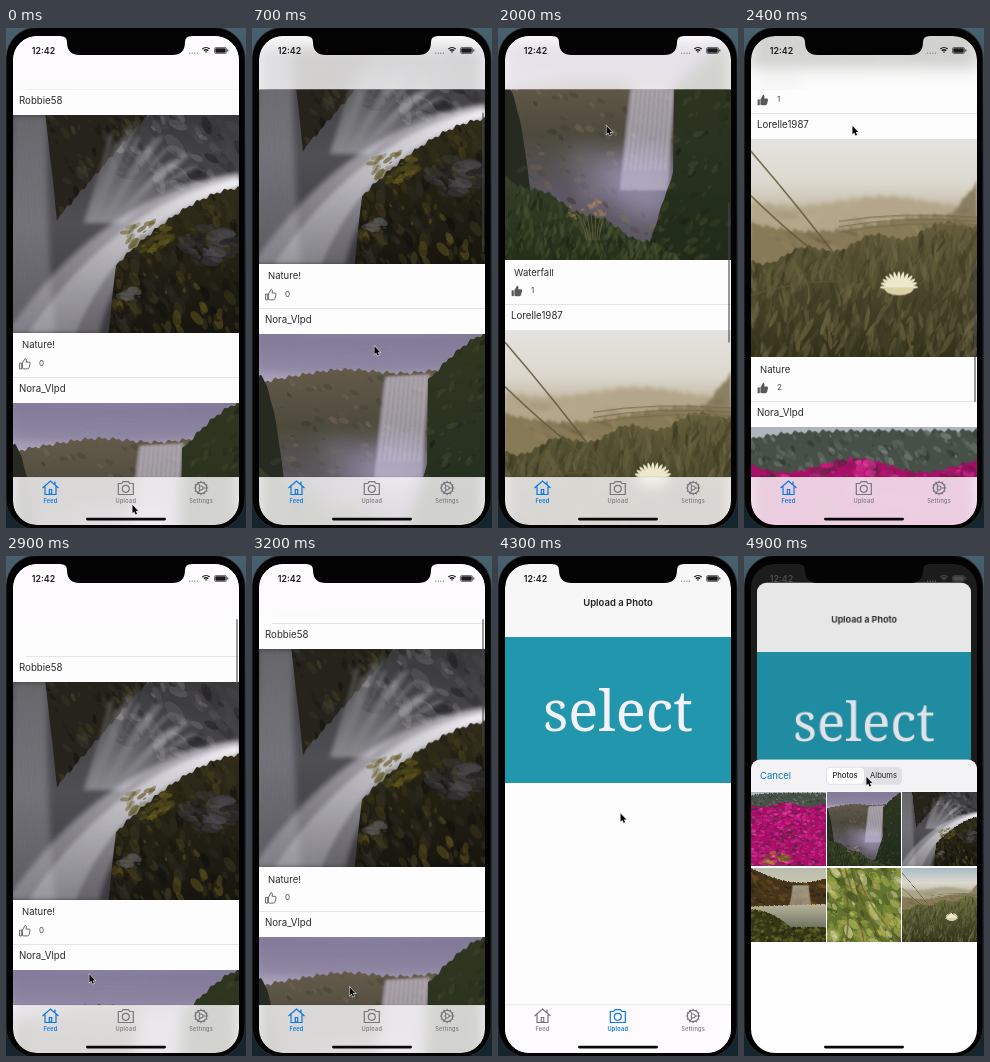
These frames come from a looping animation (240x500 px, 5000 ms). An HTML page with a canvas:

```html
<!DOCTYPE html>
<html lang="en">
<head>
<meta charset="utf-8">
<title>Photo feed</title>
<style>
html, body { margin: 0; width: 100%; height: 100%; overflow: hidden; background: #000; }
canvas { display: block; width: 240px; height: 500px; }
</style>
</head>
<body>
<canvas id="stage" width="240" height="500"></canvas>
<script>
const W = 240, H = 500, PW = 226, PH = 218, POST = 288, LOOP = 5000, STEP = 100;
const BLUE = '#0a78e6', GREY = '#77777b', SANS = 'Inter, "Liberation Sans", sans-serif';
const c = document.getElementById('stage').getContext('2d');

function layer(w, h) {
  const el = document.createElement('canvas');
  el.width = w;
  el.height = h;
  return el.getContext('2d');
}

let seed = 7;
function rnd(a = 0, b = 1) {
  seed = (seed * 1664525 + 1013904223) >>> 0;
  return a + (b - a) * seed / 4294967296;
}

function fade(g, y0, y1, ...colors) {
  const f = g.createLinearGradient(0, y0, 0, y1);
  colors.forEach((col, i) => f.addColorStop(i / (colors.length - 1), col));
  return f;
}

function box(g, x, y, w, h, fill, r = 0) {
  g.beginPath();
  g.roundRect(x, y, w, h, r);
  g.fillStyle = fill;
  g.fill();
}

function text(g, str, x, y, size, color = '#2a2a2c', weight = 400, align = 'left') {
  g.font = `${weight} ${size}px ${SANS}`;
  g.textAlign = align;
  g.textBaseline = 'middle';
  g.fillStyle = color;
  g.fillText(str, x, y);
}

// Photo painting: everything is a ridge, a scatter of dabs or a bundle of curves.
function dab(g, x, y, w, h, tilt, color) {
  const s = rnd(.3, 1.5);
  g.globalAlpha = rnd(.2, .65);
  g.fillStyle = color;
  g.beginPath();
  g.ellipse(x, y, w * s, h * s, tilt + rnd(-.5, .5), 0, 7);
  g.fill();
  g.globalAlpha = 1;
}

function cluster(g, n, tones, x, y, rx, ry, w, h, tilt = 0) {
  for (let i = 0; i < n; i++) {
    const a = rnd(0, 6.28), r = Math.sqrt(rnd());
    dab(g, x + rx * r * Math.cos(a), y + ry * r * Math.sin(a), w, h, tilt, tones[i % tones.length]);
  }
}

// Ground below the edge y = f(x), or rock hanging above it.
function land(g, edge, fill, tones = [], n = 0, { w = 4, h = 2, tilt = 0, hang = false, blur = .6 } = {}) {
  const l = layer(PW, PH), base = hang ? 0 : PH;
  l.moveTo(0, base);
  for (let x = 0; x <= PW; x++) l.lineTo(x, edge(x) + (hang ? 1 : -1) * (Math.sin(x * .45) + Math.sin(x * .9)));
  l.lineTo(PW, base);
  l.fillStyle = fill;
  l.fill();
  l.globalCompositeOperation = 'source-atop';
  for (let i = 0; i < n; i++) {
    const x = rnd(0, PW), y = edge(x);
    dab(l, x, y + (base - y) * rnd(), w, h, tilt, tones[i % tones.length]);
  }
  g.filter = `blur(${blur}px)`;
  g.drawImage(l.canvas, 0, 0);
  g.filter = 'none';
}

function stream(g, n, color, width, curve, blur = 1.5) {
  g.strokeStyle = color;
  g.lineWidth = width;
  g.filter = `blur(${blur}px)`;
  for (let i = 0; i < n; i++) {
    const [x, y, ...rest] = curve(i / (n - 1));
    g.beginPath();
    g.moveTo(x, y);
    g.quadraticCurveTo(...rest);
    g.stroke();
  }
  g.filter = 'none';
}

function photo(draw) {
  const g = layer(PW, PH);
  draw(g);
  return g.canvas;
}

const rapids = photo(g => {
  box(g, 0, 0, PW, PH, fade(g, 0, PH, '#39383a', '#504f54', '#39383d'));
  cluster(g, 90, ['#6f6e70', '#242325', '#48464a'], 160, 30, 75, 42, 9, 4, .8);
  stream(g, 16, 'rgba(190,190,198,.2)', 5, k => [34 * k, 0, 30 * k, 90, 50 * k - 10, PH], 3);
  land(g, x => x < 44 ? 104 - 9 * (44 - x) : 104 - 1.15 * (x - 44), '#25231b',
    ['#4b4521', '#15140f', '#3b3a35', '#121110'], 150, { w: 5, tilt: 1, hang: true });
  stream(g, 17, 'rgba(225,224,232,.3)', 3.5, k => [98 + 90 * k, 18 + 40 * k * k + 10 * Math.sin(k * 20), 92 + 55 * k, 50 + 20 * k, 72 + 38 * k, 108], 2);
  stream(g, 22, 'rgba(222,221,229,.2)', 6, k => [PW, 60 + 12 * k, 90 + 20 * k, 80 + 32 * k, 88 * k - 4, PH], 2);
  stream(g, 9, 'rgba(250,250,253,.32)', 3, k => [PW, 65 + 4 * k, 108, 85 + 20 * k, 18 + 42 * k, PH], 2);
  land(g, x => 73 + 77 * (Math.max(0, PW - x) / 123) ** 1.6 + Math.max(0, 103 - x) * 8, fade(g, 75, PH, '#302c18', '#232013', '#17150f'),
    ['#5b511c', '#100f0b', '#3a3619', '#1d1b13', '#2d2a22'], 420, { w: 6, h: 3, tilt: 1.2 });
  cluster(g, 45, ['#3d3b3e', '#19181a', '#535156'], 200, 130, 28, 19, 9, 4, .3);
  cluster(g, 45, ['#6a5f1d', '#514a1c'], 135, 122, 24, 15, 5, 2, -.5);
  cluster(g, 10, ['#5c5a58'], 118, 180, 10, 5, 6, 3);
});

const falls = photo(g => {
  box(g, 0, 0, PW, PH, fade(g, 0, 120, '#8d86a3', '#b0a8bf', '#8e859f'));
  stream(g, 9, 'rgba(110,102,132,.22)', 7, k => [0, 34 * k, 110, 34 * k + 8, PW, 30 * k], 3);
  land(g, x => 37 + 13 * Math.exp(-x / 25) + 2 * Math.sin(x / 18), fade(g, 35, 150, '#645a4a', '#4d4a3c', '#5d5763'),
    ['#71654f', '#45483a', '#39392f', '#5c5547'], 240, { tilt: .5 });
  land(g, x => 42 + x * x / 6, '#262a20', ['#1a1e16', '#343a2a'], 30);
  g.filter = 'blur(11px)';
  cluster(g, 9, ['#a69dbd'], 118, 138, 48, 20, 24, 16);
  g.filter = 'none';
  stream(g, 26, 'rgba(205,197,221,.42)', 3, k => [127 + 43 * k, 43 - 3 * k, 122 + 44 * k, 80, 116 + 46 * k, 148], 1.2);
  stream(g, 9, 'rgba(240,236,250,.35)', 1.5, k => [130 + 36 * k, 42, 126 + 38 * k, 85, 120 + 40 * k, 128], 1);
  land(g, x => x > 168 ? 48 * ((PW - x) / 58) ** 1.4 : 130 + 3 * (168 - x), fade(g, 0, PH, '#30361f', '#293220', '#202a18'),
    ['#3e4727', '#171d13', '#424529', '#242e1b'], 420, { tilt: -.8 });
  land(g, x => 134 + .46 * x + 3 * Math.sin(x / 9), fade(g, 134, PH, '#343d28', '#263019'),
    ['#435029', '#1a2415', '#3a4826', '#4b5536'], 420, { w: 1.5, h: 5, tilt: .2 });
  stream(g, 7, '#67664a', .7, k => [82 + 12 * k, 198, 78 + 18 * k, 175, 62 + 44 * k, 160 + 10 * Math.sin(k * 9)], .3);
  cluster(g, 26, ['#a97d58', '#b58c66'], 82, 166, 20, 13, 2, 1.3);
});

function field(sky, haze, dark, light) {
  return photo(g => {
    box(g, 0, 0, PW, PH, fade(g, 0, 90, sky, '#dcd8ce', haze));
    land(g, x => 62 + 5 * Math.sin(x / 28), haze, ['#bbae8e', '#93856a', '#a39575'], 120, { w: 12, blur: 2 });
    land(g, x => 100 - 57 * Math.max(0, (x - 180) / 46), '#8b7f63', ['#6d6347', '#a09476'], 60, { blur: 1.5 });
    land(g, x => 84 + 8 * Math.sin(x / 40), '#877a57', ['#9c8d68', '#685b3d', '#776a49'], 200, { w: 8, h: 1.5, tilt: .6, blur: 1 });
    land(g, x => 122 - .18 * x + 5 * Math.sin(x / 11), fade(g, 85, PH, light, dark, '#33301b'),
      [dark, light, '#3a371f', '#706843'], 620, { w: 2, h: 9, tilt: .15 });
    stream(g, 3, '#5f5538', 1.2, k => [0, 12 + 34 * k + 110 * k * k, 50, 70 + 70 * k, 95, 130 + 12 * k], .4);
    stream(g, 3, '#776b4e', 1, k => [PW, 78 + 8 * k, 150, 72 + 9 * k, 88, 82 + 11 * k], .4);
    for (let a = Math.PI; a < 6.4; a += .26) {
      g.fillStyle = '#eee9cb';
      g.beginPath();
      g.ellipse(148 + 10 * Math.cos(a), 148 + 7 * Math.sin(a), 9, 1.8, Math.atan2(Math.sin(a), Math.cos(a)), 0, 7);
      g.fill();
    }
    g.beginPath();
    g.ellipse(148, 148, 15, 8, 0, 0, Math.PI);
    g.fillStyle = '#dad2a6';
    g.fill();
  });
}
const dunes = field('#e5e3e0', '#b3a68a', '#48452a', '#665f3c');
const coast = field('#a9bac6', '#aaa58b', '#47502a', '#727544');

const blooms = photo(g => {
  box(g, 0, 0, PW, PH, '#aeb5bd');
  land(g, x => 3 + 9 * Math.exp(-x / 30), '#465047', ['#6b766b', '#2b352d', '#566157', '#838b82'], 900, { tilt: .8 });
  land(g, x => 38 + 7 * Math.sin(x / 22), '#a80f68', ['#dc2896', '#c8147f', '#761050', '#2f3528', '#e846a4'], 900, { w: 5, h: 3 });
  cluster(g, 45, ['#c6a735', '#59641f'], 75, 200, 48, 22, 8, 4);
});

const cove = photo(g => {
  box(g, 0, 0, PW, PH, fade(g, 0, 110, '#b9bcae', '#ddd5b6'));
  land(g, x => 44 * Math.sin(x / 95), '#46341a', ['#70501f', '#2b2313', '#5a4820'], 260, { w: 9, h: 4, tilt: .5 });
  stream(g, 12, 'rgba(235,229,213,.5)', 5, k => [128 + 42 * k, 52, 126 + 46 * k, 80, 118 + 60 * k, 114]);
  land(g, x => 114 - x / 30, fade(g, 106, 190, '#bbb69d', '#5f6754'));
  land(g, x => 122 + 52 * Math.min(1, x / 120) ** 2, '#343715', ['#626626', '#222610', '#7a702b'], 240, { w: 5, h: 4 });
});

const foliage = photo(g => {
  box(g, 0, 0, PW, PH, '#637331');
  cluster(g, 380, ['#9cab45', '#5e7428', '#c4c867', '#39491d', '#aaa650', '#d8d7a1'], 113, 109, 160, 150, 15, 8, .8);
  stream(g, 4, '#6b5428', 3, k => [40 + 50 * k, 0, 80 + 30 * k, 100, 60 + 160 * k, PH]);
});

const posts = [
  ['Robbie58', rapids, 'Nature!', 0],
  ['Nora_Vlpd', falls, 'Waterfall', 1],
  ['Lorelle1987', dunes, 'Nature', 2],
  ['Nora_Vlpd', blooms, '', 0]
];
const thumbs = [blooms, falls, rapids, cove, foliage, coast];

// Motion
const ramp = (t, a, b) => Math.min(1, Math.max(0, (t - a) / (b - a)));
const out = (t, a, b) => 1 - (1 - ramp(t, a, b)) ** 2;
function smooth(t, a, b) {
  const k = ramp(t, a, b);
  return k * k * (3 - 2 * k);
}

// Drag, fling down, fling back past the top, bounce.
const scrollAt = t => 226 * out(t, 600, 1200) + 334 * smooth(t, 1630, 2480)
  - 599 * smooth(t, 2450, 2870) + 39 * out(t, 2900, 3400);
const barAt = t => ramp(t, 600, 700) - ramp(t, 3700, 4000);
const sheetAt = t => ramp(t, 4660, 5030);

// Resting points of the pointer: time, x, y.
const stops = [[0, 126.5, 477], [500, 123, 390], [1000, 121.5, 186], [1600, 112, 260], [2000, 108.5, 98],
  [2400, 108.5, 98], [2850, 83, 418], [3700, 123, 454], [4500, 122.5, 221]];
function pointerAt(t) {
  let [, x, y] = stops[0];
  for (let i = 1; i < stops.length; i++) {
    const [a, px, py] = stops[i - 1], [b, qx, qy] = stops[i], k = smooth(t, a, b);
    x += (qx - px) * k;
    y += (qy - py) * k;
  }
  return [x, y];
}

// Icons
const hand = new Path2D('M3.4 5.6L6 1q2.1 0 1.2 3.6h2.8q1.4.2 1 1.7l-1 4q-.3 1.1-1.5 1.1H4.8l-1.4-.6z');
const cuff = new Path2D('M.6 5.6h2.2v5.8H.6z');
const arrow = new Path2D('M0 0V9L2 7.2 3.5 10.5 5 9.8 3.5 6.7H6.3z');
const house = new Path2D('M-8 0L0-7 8 0M-5.5-1.5V6.5H5.5V-1.5M4.5-6.5V-3.5M-1.2 6V1.5H1.2V6z');
const camera = new Path2D('M-7.5-4.5H-4l1.3-1.8H2.7L4-4.5H7.5V6.5H-7.5z');
const gear = new Path2D();
camera.moveTo(3.5, .8);
camera.arc(0, .8, 3.5, 0, 7);
gear.arc(0, 0, 5.7, 0, 7);
gear.moveTo(2, 0);
gear.arc(0, 0, 2, 0, 7);
for (let i = 0; i < 12; i++) {
  const x = Math.cos(i * Math.PI / 6), y = Math.sin(i * Math.PI / 6);
  gear.moveTo((i % 4 ? 5.7 : 2) * x, (i % 4 ? 5.7 : 2) * y);
  gear.lineTo(7.2 * x, 7.2 * y);
}

// Screens
const page = layer(W, H);

function drawFeed(s) {
  box(page, 0, 0, W, H, '#fefdfe');
  posts.forEach(([name, img, caption, likes], k) => {
    const y = k * POST - s;
    box(page, k ? 7 : 20, y + 61, PW, .7, '#dcdbde');
    text(page, name, 13, y + 73, 9.7);
    page.drawImage(img, 7, y + 87);
    text(page, caption, 16, y + 317.5, 9.5);
    page.save();
    page.translate(13, y + 329.5);
    page.fillStyle = page.strokeStyle = '#58585b';
    page.lineWidth = .9;
    for (const part of [hand, cuff]) {
      if (likes) page.fill(part);
      else page.stroke(part);
    }
    page.restore();
    text(page, likes, 33, y + 335.5, 8, '#444');
  });
}

function drawUpload() {
  box(page, 0, 0, W, H, '#fefdfe');
  box(page, 0, 0, W, 81, '#f8f7f7');
  text(page, 'Upload a Photo', 120, 47.5, 9.5, '#222', 600, 'center');
  box(page, 0, 81, W, 146, '#2296ac');
  page.font = '56px "Noto Serif", "Liberation Serif", serif';
  page.textAlign = 'center';
  page.textBaseline = 'alphabetic';
  page.fillStyle = '#f3f1fa';
  page.fillText('select', 120, 174.5);
}

function glass(y, h) {
  c.save();
  c.beginPath();
  c.rect(7, y, PW, h);
  c.clip();
  c.filter = 'blur(7px)';
  c.drawImage(page.canvas, 0, 0);
  c.filter = 'none';
  box(c, 7, y, PW, h, 'rgba(253,252,253,.8)');
  c.restore();
}

function tabs(active) {
  glass(449, 51);
  box(c, 7, 448.6, PW, .6, 'rgba(0,0,0,.12)');
  [['Feed', house], ['Upload', camera], ['Settings', gear]].forEach(([label, icon], i) => {
    const color = i === active ? BLUE : GREY, x = 44.5 + 75.3 * i;
    c.save();
    c.translate(x, 460);
    c.strokeStyle = color;
    c.lineWidth = 1.2;
    c.stroke(icon);
    c.restore();
    c.letterSpacing = '.25px';
    text(c, label, x, 473.5, 5.6, color, i === active ? 600 : 500, 'center');
    c.letterSpacing = '0px';
  });
}

function status(color) {
  text(c, '12:42', 37.5, 23, 8.8, color, 600, 'center');
  for (let i = 0; i < 4; i++) box(c, 183 + i * 2.6, 24.5, 1.3, 1.3, GREY, 1);
  c.strokeStyle = color;
  c.lineWidth = 1.4;
  for (let r = 1; r < 6; r += 2.2) {
    c.beginPath();
    c.arc(200, 25, r, -2.3, -.84);
    c.stroke();
  }
  c.lineWidth = .6;
  c.beginPath();
  c.roundRect(208.5, 19.5, 12, 6, 1.6);
  c.stroke();
  box(c, 209.3, 20.3, 10.4, 4.4, color, 1);
  box(c, 221.3, 21.5, 1, 2, color);
}

function picker(y) {
  box(c, 7, y, PW, H, '#fefefe', 9);
  box(c, 7, y, PW, 32, '#f3f2f4', [9, 9, 0, 0]);
  text(c, 'Cancel', 16, y + 16, 9.5, '#0879b8');
  box(c, 82, y + 7, 76, 18, '#e1e0e3', 4.5);
  box(c, 83, y + 8, 37, 16, '#fff', 4);
  text(c, 'Photos', 101, y + 16, 7.6, '#222', 500, 'center');
  text(c, 'Albums', 139.5, y + 16, 7.6, '#222', 400, 'center');
  thumbs.forEach((img, i) =>
    c.drawImage(img, 4, 0, PH, PH, 7 + i % 3 * 75.7, y + 32 + Math.floor(i / 3) * 75.7, 74.6, 74.6));
}

function notch() {
  c.fillStyle = '#030303';
  c.fill(new Path2D('M54 7V8Q61 8 61 14Q61 27 74 27H166Q179 27 179 14Q179 8 186 8V7z'));
}

function clipTo(r) {
  c.beginPath();
  c.roundRect(7, 8, PW, 489, r);
  c.clip();
}

function draw(t) {
  const s = scrollAt(t), p = sheetAt(t), uploading = t >= 4000;
  box(c, 0, 0, W, H, fade(c, 0, H, '#47616e', '#1b2a32', '#14252e'));
  box(c, 0, -1, 239.4, 503, '#2c2c2e', 31);
  box(c, .6, 0, 238, 501, '#030303', 30);
  c.save();
  clipTo(24);
  box(c, 0, 0, W, H, '#1c1c1d');

  c.save();
  c.translate(120, 8 + 29 * p);
  c.scale(1 - .082 * p, 1 - .082 * p);
  c.translate(-120, -8);
  clipTo(p ? 10 : 24);
  if (uploading) drawUpload();
  else drawFeed(s);
  c.drawImage(page.canvas, 0, 0);
  if (!uploading) {
    glass(8, 53.5);
    c.globalAlpha = barAt(t);
    box(c, 230, 63 + Math.max(0, s) * .31, 2, 140 + Math.min(0, s) * 1.9, 'rgba(70,70,75,.55)', 1);
    c.globalAlpha = 1;
  }
  tabs(uploading ? 1 : 0);
  box(c, 0, 0, W, H, `rgba(0,0,0,${.1 * p})`);
  c.restore();

  status(p ? '#4c4c4e' : '#1b1b1d');
  if (p) picker(497 - 452 * p);
  box(c, 80, 489.7, 80, 2.8, '#080808', 1.4);
  c.restore();
  notch();

  c.save();
  c.translate(...pointerAt(t));
  c.scale(.9, .9);
  c.strokeStyle = '#ddd';
  c.lineWidth = 1.3;
  c.stroke(arrow);
  c.fillStyle = '#000';
  c.fill(arrow);
  c.restore();
}

const start = performance.now();
function tick() {
  const t = (performance.now() - start) % LOOP;
  draw(Math.floor(t / STEP) * STEP);
  requestAnimationFrame(tick);
}
tick();
</script>
</body>
</html>
```
